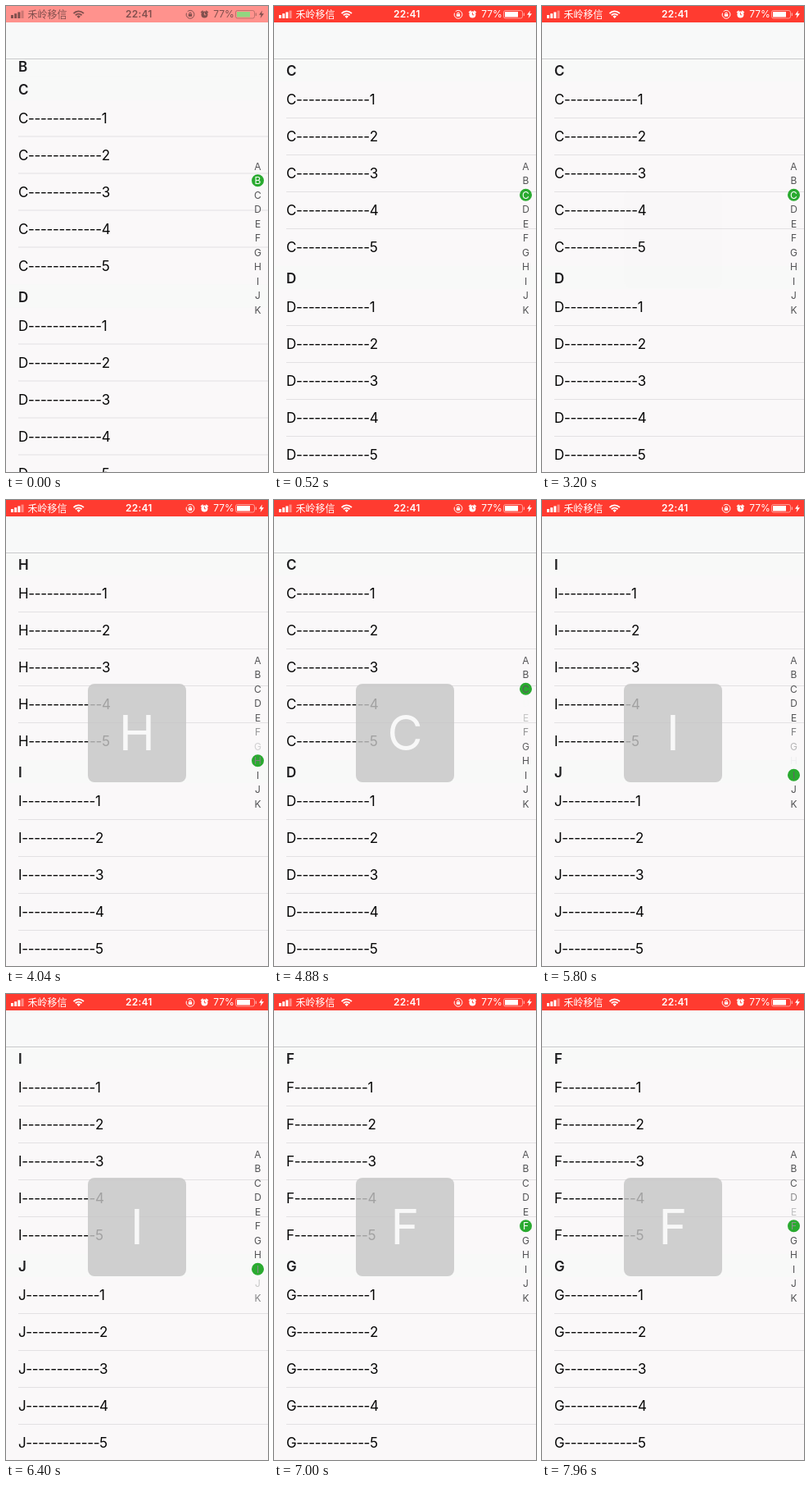
An HTML page with a canvas for the animation above (8 s loop, 320 by 568 pixels).

```html
<!DOCTYPE html>
<html lang="zh">
<head>
<meta charset="utf-8">
<style>
html, body { margin: 0; width: 100%; height: 100%; overflow: hidden; background: #faf8f9; }
canvas { display: block; width: 320px; height: 568px; }
</style>
</head>
<body>
<canvas id="stage"></canvas>
<script>
const W = 320, H = 568, LOOP = 8000;
const NAV = 64, HEAD = 28, ROW = 45, ROWS = 5, SECTION = HEAD + ROW * ROWS;
const LETTERS = 'ABCDEFGHIJK';
const MAX_SCROLL = LETTERS.length * SECTION - (H - NAV);
const FONT = 'Inter, "Noto Sans CJK SC", "Noto Sans CJK", sans-serif';
const GRAY = [82, 82, 84], WHITE = [255, 255, 255];
const FADE = 300, HUD_START = 3195, SNAP_END = 280;

const canvas = document.getElementById('stage');
const dpr = window.devicePixelRatio || 1;
canvas.width = W * dpr;
canvas.height = H * dpr;
const ctx = canvas.getContext('2d');

// Finger sweeps over the index: start, time per letter, letters
const SWEEPS = [
  [-FADE, 0, 'B'],
  [220, 0, 'C'],
  [3560, 100, 'DEFGHIJ'],
  [4340, 88, 'IHGFEDCB'],
  [5180, 99, 'CDEFGHIJK'],
  [6190, 115, 'JIHGF'],
  [7050, 115, 'EDCB'],
  [7575, 93, 'CDEF']
];
const PICKS = SWEEPS.flatMap(([start, step, run]) =>
  [...run].map((c, i) => ({ at: start + i * step, index: LETTERS.indexOf(c) })));

const clamp = x => Math.max(0, Math.min(1, x));
const mix = (a, b, k) => a.map((v, i) => v + (b[i] - v) * k);
const rgb = c => `rgb(${c.map(Math.round).join()})`;

// Draws the text and returns its advance width
function text(str, x, y, size, color, { weight = 400, align = 'left', spacing = 0 } = {}) {
  ctx.font = `${weight} ${size}px ${FONT}`;
  ctx.letterSpacing = spacing + 'px';
  ctx.textAlign = align;
  ctx.fillStyle = color;
  ctx.fillText(str, x, y);
  return ctx.measureText(str).width;
}

function box(x, y, w, h, color) {
  ctx.fillStyle = color;
  ctx.fillRect(x, y, w, h);
}

function roundBox(x, y, w, h, r) {
  ctx.beginPath();
  ctx.roundRect(x, y, w, h, r);
}

function disc(x, y, r, color) {
  ctx.beginPath();
  ctx.arc(x, y, r, 0, Math.PI * 2);
  ctx.fillStyle = color;
  ctx.fill();
}

function line(points, width, color) {
  ctx.beginPath();
  points.forEach(([x, y]) => ctx.lineTo(x, y));
  ctx.lineWidth = width;
  ctx.strokeStyle = color;
  ctx.stroke();
}

// Separate parts keep the hyphens at their plain, lower height
function drawRow(letter, number, y) {
  let x = 15;
  for (const part of [letter, '-'.repeat(12), String(number)]) {
    x += text(part, x, y, 17, '#050505', { spacing: -0.34 });
  }
}

function drawList(scroll) {
  [...LETTERS].forEach((c, s) => {
    const top = NAV + s * SECTION - scroll;
    if (top > H || top + SECTION < 0) return;
    for (let r = 0; r < ROWS; r++) {
      const y = top + HEAD + r * ROW;
      drawRow(c, r + 1, y + 28);
      if (r < ROWS - 1) box(15, y + ROW - 1, W - 15, 1, '#e3e1e3');
    }
    const y = Math.max(top, Math.min(NAV, top + SECTION - HEAD));
    box(0, y, W, HEAD, '#f8f9f8');
    text(c, 15, y + 21, 17, '#1c1c1e', { weight: 600, spacing: -0.41 });
  });
}

function drawIndex(t, current) {
  [...LETTERS].forEach((c, i) => {
    const x = 307.5, y = 195.3 + i * 17.5;
    let color = GRAY;
    if (i === current.index) {
      disc(x, y, 7.5, '#2aaa30');
      color = mix(GRAY, WHITE, clamp((t - current.at) / FADE));
    } else {
      const n = PICKS.findLastIndex(p => p.at <= t && p.index === i);
      if (n >= 0) color = mix(WHITE, GRAY, clamp((t - PICKS[n + 1].at) / FADE));
    }
    text(c, x, y + 4.3, 12, rgb(color), { align: 'center' });
  });
}

function drawHud(t, letter) {
  const alpha = clamp((t - HUD_START) / FADE);
  if (!alpha) return;
  ctx.globalAlpha = alpha;
  roundBox(100, 224, 120, 120, 8);
  ctx.fillStyle = 'rgba(198,198,198,0.81)';
  ctx.fill();
  text(letter, 160, 305, 59, '#f8f8f8', { align: 'center' });
  ctx.globalAlpha = 1;
}

function drawStatus(t) {
  const k = clamp(t / 300);
  const ink = rgb(mix([128, 78, 76], WHITE, k));
  const fill = rgb(mix([146, 214, 128], WHITE, k));
  const back = rgb(mix([255, 146, 141], [255, 59, 48], k));
  box(0, 0, W, 20, back);

  for (let i = 0; i < 4; i++) {
    ctx.globalAlpha = i < 3 ? 1 : 0.4;
    box(6 + i * 4.2, 11 - i * 1.8, 3, 4 + i * 1.8, ink);
  }
  ctx.globalAlpha = 1;
  text('禾岭移信', 26.5, 14.6, 12, ink);

  // Wi-Fi
  ctx.strokeStyle = ink;
  ctx.lineWidth = 1.9;
  for (const r of [5.2, 8.4]) {
    ctx.beginPath();
    ctx.arc(88.7, 14.8, r, -Math.PI * 0.76, -Math.PI * 0.24);
    ctx.stroke();
  }
  ctx.beginPath();
  ctx.moveTo(88.7, 15);
  ctx.arc(88.7, 14.8, 3, -Math.PI * 0.76, -Math.PI * 0.24);
  ctx.fillStyle = ink;
  ctx.fill();

  text('22:41', 162.3, 14.4, 12, ink, { weight: 600, align: 'center', spacing: 0.2 });

  // Rotation lock
  ctx.lineWidth = 1;
  ctx.beginPath();
  ctx.arc(225, 10.3, 4.9, -2.3, 3.5);
  ctx.stroke();
  box(222.8, 9.6, 4.4, 3.2, ink);
  ctx.beginPath();
  ctx.arc(225, 9.4, 1.4, Math.PI, 0);
  ctx.stroke();

  // Alarm
  disc(242.4, 10.6, 4, ink);
  line([[238, 8], [240.6, 5.8]], 1.4, ink);
  line([[244.2, 5.8], [246.8, 8]], 1.4, ink);
  line([[242.4, 8], [242.4, 10.8], [244.4, 10.8]], 0.9, back);

  text('77%', 253.3, 14.4, 12, ink);

  // Battery
  ctx.globalAlpha = 0.55;
  roundBox(280.5, 5.5, 23, 9.5, 2.2);
  ctx.lineWidth = 0.9;
  ctx.strokeStyle = ink;
  ctx.stroke();
  box(304.7, 8.5, 1.3, 3.5, ink);
  ctx.globalAlpha = 1;
  box(282, 7, 16, 6.5, fill);
  ctx.beginPath();
  [[313, 5.5], [309, 10.8], [311.6, 10.8], [310.6, 15], [315, 9.3], [312.2, 9.3]]
    .forEach(([x, y]) => ctx.lineTo(x, y));
  ctx.fillStyle = ink;
  ctx.fill();
}

function draw(t) {
  const current = PICKS.findLast(p => p.at <= t);
  const snap = 22.5 * Math.pow(1 - clamp((t - 30) / SNAP_END), 2);
  const scroll = t < HUD_START ? 2 * SECTION - snap : Math.min(current.index * SECTION, MAX_SCROLL);

  ctx.setTransform(dpr, 0, 0, dpr, 0, 0);
  box(0, 0, W, H, '#faf8f9');
  drawList(scroll);
  box(0, 0, W, NAV, '#f8f9f9');
  box(0, NAV, W, 1, '#c9cacb');
  drawIndex(t, current);
  drawHud(t, LETTERS[current.index]);
  drawStatus(t);
}

const begin = performance.now();
function tick() {
  draw((performance.now() - begin) % LOOP);
  requestAnimationFrame(tick);
}
tick();
</script>
</body>
</html>
```
